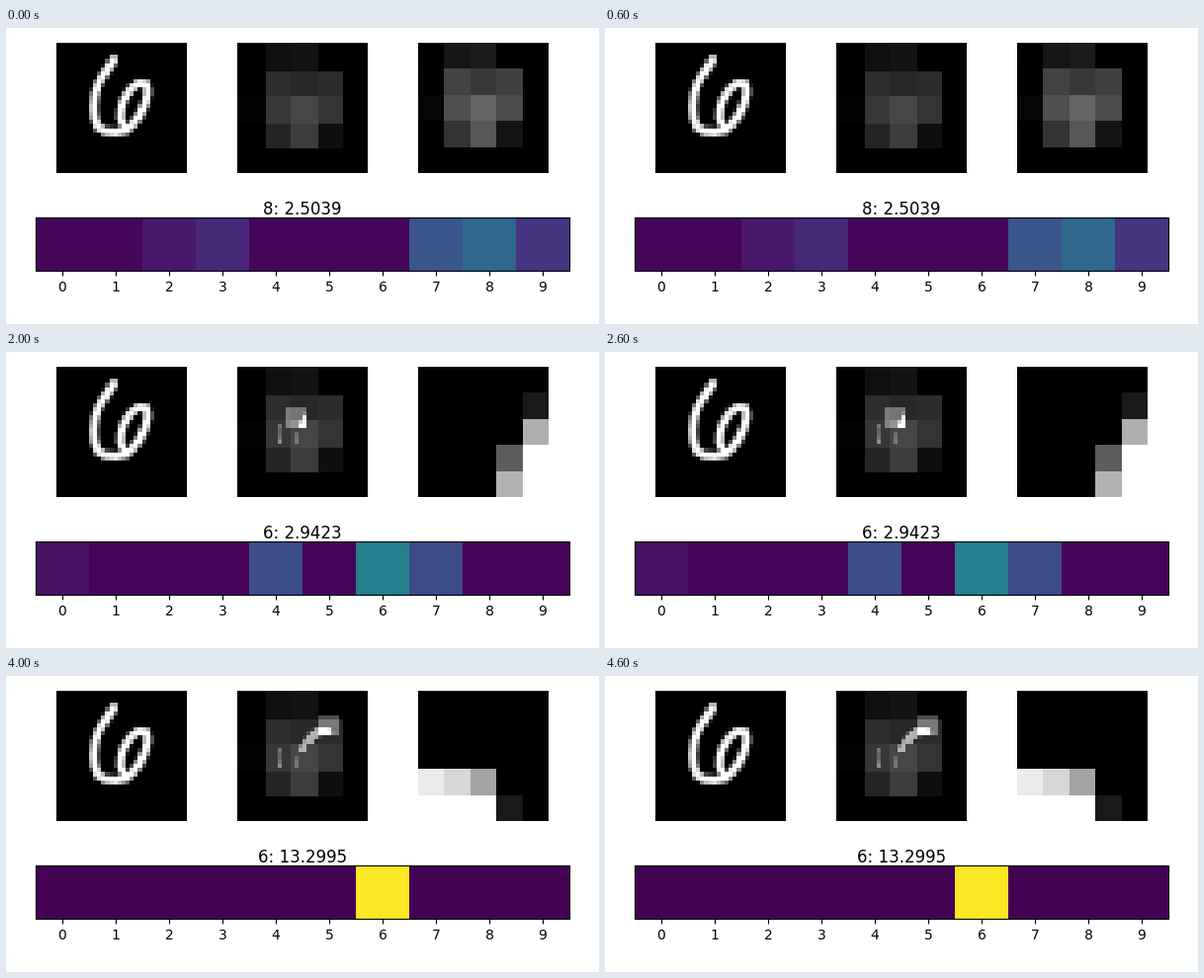
Animation of 600 by 300 pixels, one loop 5000 ms. Source, as a matplotlib script:

```python
import numpy as np
import matplotlib.pyplot as plt
from matplotlib.animation import FuncAnimation

W, H, DPI = 600, 300, 100
SIZE, PATCH = 32, 5

# Pen path of the digit, in image cells (x, y)
PATH = np.array([
    (14, 4.1), (13.2, 5.5), (11.8, 7.5), (10.4, 10), (9.5, 12.8),
    (9.2, 15.8), (9.4, 18.4), (10.2, 20.6), (12, 21.7), (14.5, 21.9),
    (17, 21.5), (18.9, 20), (20.4, 17.9), (21.7, 15), (22.4, 12),
    (22, 10.2), (20.1, 10.05), (18.4, 11.4), (17.4, 12.6), (16.4, 14.2),
    (15.8, 16.5), (15.7, 18.6), (16.6, 20.6)])

# Top-left cell (x, y) of each close look
LOOKS = [(10, 14), (12, 10), (16, 8), (20, 6)]

# Winning score and leading class probabilities per step
STEPS = [
    (2.5039, {8: .335, 7: .265, 9: .155, 3: .115, 2: .07}),
    (3.2548, {7: .695, 8: .1, 4: .06, 0: .045}),
    (2.9423, {6: .43, 4: .235, 7: .23, 0: .045}),
    (7.6836, {6: .985}),
    (13.2995, {6: 1}),
]


def draw_digit():
    """Soft-edged stroke along the pen path."""
    t = np.linspace(0, len(PATH) - 1, 900)
    k = np.arange(len(PATH))
    px, py = (np.interp(t, k, PATH[:, i]) for i in (0, 1))
    cy, cx = np.mgrid[:SIZE, :SIZE] + .5
    dist = np.hypot(cx[..., None] - px, cy[..., None] - py).min(axis=-1)
    return np.clip(1.5 - dist, 0, 1)


def shrink(img):
    """Downscale to PATCH x PATCH with a triangle filter."""
    step = SIZE / PATCH
    centres = (np.arange(PATCH) + .5) * step
    cells = np.arange(SIZE) + .5
    wts = np.clip(1 - abs(centres[:, None] - cells) / step, 0, None)
    wts /= wts.sum(axis=1, keepdims=True)
    return wts @ img @ wts.T


def enlarge(img):
    idx = np.arange(SIZE) * PATCH // SIZE
    return img[np.ix_(idx, idx)]


def window(look):
    x, y = look
    return slice(y, y + PATCH), slice(x, x + PATCH)


digit = draw_digit()
coarse = shrink(digit)


def glimpse(step):
    return digit[window(LOOKS[step - 1])] if step else coarse


def memory(step):
    """Everything seen so far, with the current window lit up."""
    known = np.zeros((SIZE, SIZE))
    lit = np.zeros((SIZE, SIZE))
    for look in LOOKS[:step]:
        win = window(look)
        known[win] = digit[win]
    if step:
        lit[win] = 1
    return .7 * np.clip(enlarge(coarse) + known, 0, 1) + .3 * lit


def prob_row(step):
    """Leading classes as given; the others share the remainder."""
    lead = STEPS[step][1]
    rest = (1 - sum(lead.values())) / (10 - len(lead))
    return [[lead.get(c, rest) for c in range(10)]]


fig = plt.figure(figsize=(W / DPI, H / DPI), dpi=DPI, facecolor="white")


def add_axes(x, y, w, h):
    return fig.add_axes([x / W, 1 - (y + h) / H, w / W, h / H])


def gray_panel(x, data):
    # Slightly under 132 wide, so rounding never adds a column
    ax = add_axes(x + .01, 15, 131.98, 132)
    ax.axis("off")
    return ax.imshow(data, cmap="gray", vmin=0, vmax=1, aspect="auto",
                     interpolation="nearest")


gray_panel(51, digit)
memory_im = gray_panel(234, memory(0))
glimpse_im = gray_panel(417, glimpse(0))

bar = add_axes(29.95, 192.4, 540, 54)
bar_im = bar.imshow(prob_row(0), cmap="viridis", vmin=0, vmax=1,
                    aspect="auto", interpolation="nearest")
bar.set_xticks(range(10))
bar.set_yticks([])
title = fig.text(.5, 1 - 188.6 / H, "", fontsize=11.95, ha="center",
                 va="baseline")


def update(step):
    probs = prob_row(step)
    memory_im.set_data(memory(step))
    glimpse_im.set_data(glimpse(step))
    bar_im.set_data(probs)
    title.set_text(f"{np.argmax(probs)}: {STEPS[step][0]:.4f}")
    return memory_im, glimpse_im, bar_im, title


anim = FuncAnimation(fig, update, frames=len(STEPS), interval=1000,
                     repeat=True, repeat_delay=0)
plt.show()
```
